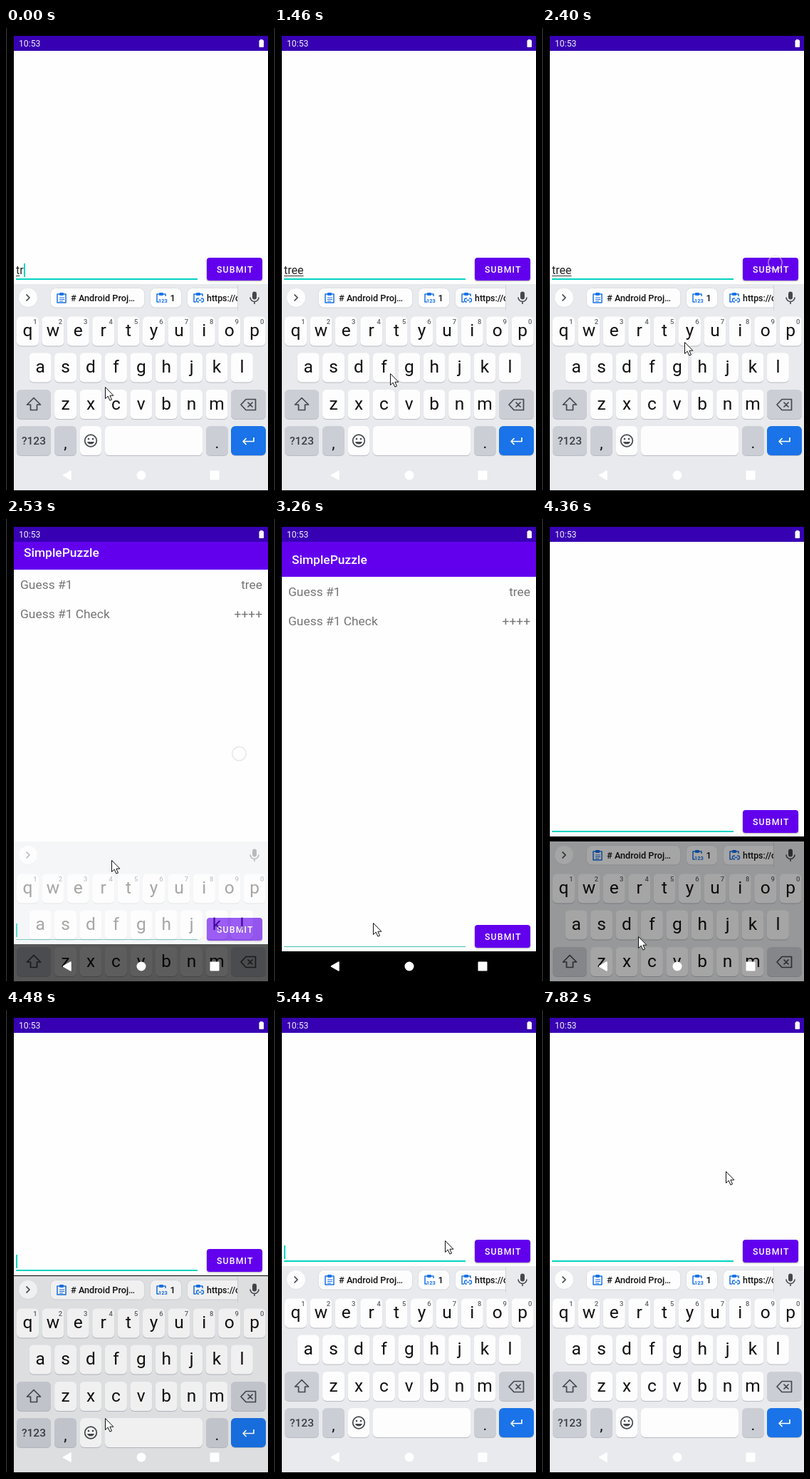
Write an HTML page with a canvas that moves like this. It is 368 px wide and 649 px high and loops after 8000 ms.

```html
<!DOCTYPE html>
<html lang="en">
<head>
<meta charset="utf-8">
<title>Word guessing app</title>
<style>
html, body { margin: 0; width: 368px; height: 649px; overflow: hidden; background: #000; }
canvas { display: block; width: 368px; height: 649px; }
</style>
</head>
<body>
<canvas id="stage"></canvas>
<script>
const W = 368, H = 649, LOOP = 8000, PAN = 247;
const dpr = window.devicePixelRatio || 1;
const PURPLE = '#6200ee', TEAL = '#03d3c0', BLUE = '#1a73e8', INK = '#44474b';
const GREY_KEY = '#cbced5', BOARD = '#e8eaed';

function prepare(canvas) {
  canvas.width = W * dpr;
  canvas.height = H * dpr;
  const ctx = canvas.getContext('2d');
  ctx.scale(dpr, dpr);
  return ctx;
}
const main = prepare(document.getElementById('stage'));

// ---------- drawing helpers ----------
function box(c, x, y, w, h, color, r = 0) {
  c.fillStyle = color;
  c.beginPath();
  if (r) c.roundRect(x, y, w, h, r); else c.rect(x, y, w, h);
  c.fill();
}
function text(c, str, x, y, size, color, { weight = 400, align = 'left', spacing = 0 } = {}) {
  c.font = `${weight} ${size}px Roboto, sans-serif`;
  c.letterSpacing = spacing + 'px';
  c.textAlign = align;
  c.fillStyle = color;
  c.fillText(str, x, y);
}
function line(c, d, color, width = 1.7) {
  c.strokeStyle = color;
  c.lineWidth = width;
  c.stroke(new Path2D(d));
}
function disc(c, x, y, r, color) {
  c.fillStyle = color;
  c.beginPath();
  c.arc(x, y, r, 0, 7);
  c.fill();
}
function shape(c, d, color) {
  c.fillStyle = color;
  c.fill(new Path2D(d));
}

// ---------- keyboard ----------
function key(c, x, y, w, color = '#fdfdfe') {
  box(c, x, y + 1, w, 41, '#b9bcc2', 6);
  box(c, x, y, w, 41, color, 6);
}
function letterRow(c, letters, x, y, hints) {
  [...letters].forEach((ch, i) => {
    const cx = x + i * 35.4;
    key(c, cx - 15.5, y, 31);
    text(c, ch, cx, y + 27.5, 24.5, '#111', { align: 'center' });
    if (hints) text(c, (i + 1) % 10, cx + 10.5, y + 10, 9.5, '#5f6368', { weight: 500, align: 'center' });
  });
}
function clipboard(c, x, y, open) {
  const side = open ? `M${x + 4} ${y + 13}H${x + 1}V${y + 2}H${x + 13}V${y + 5}`
                    : `M${x + 1} ${y + 2}H${x + 13}V${y + 14}H${x + 1}Z`;
  line(c, side, BLUE, 1.5);
  box(c, x + 4, y, 6, 4, BLUE, 1);
}
function chip(c, x, w) {
  box(c, x - .5, 364.5, w + 1, 28, '#d3d6da', 7);
  box(c, x, 365, w, 26.5, '#fdfdfe', 6.5);
}
function drawChips(c) {
  const style = { weight: 500 };
  c.save();
  c.beginPath();
  c.rect(50, 359, 275, 40);
  c.clip();
  chip(c, 63, 131);
  clipboard(c, 71, 371);
  line(c, 'M75 378H82M75 380.5H82M75 383H80', BLUE, 1.2);
  text(c, '# Android Proj…', 91, 383, 12.7, '#111', style);
  chip(c, 203, 43);
  clipboard(c, 211, 371, true);
  text(c, '123', 214, 385, 7.5, BLUE, { weight: 700 });
  text(c, '1', 230.5, 383, 12.7, '#111', style);
  chip(c, 255, 90);
  clipboard(c, 263, 371, true);
  line(c, 'M271 379H270A2.5 2.5 0 0 0 270 384H271M274 379H275A2.5 2.5 0 0 1 275 384H274M270.5 381.5H274.5', BLUE, 1.4);
  text(c, 'https://c', 282, 383, 12.4, '#111', style);
  c.restore();
  box(c, 325, 360, 1, 36, '#d0d3d7');
}
function makeKeyboard(withChips) {
  const canvas = document.createElement('canvas');
  const c = prepare(canvas);
  c.lineJoin = 'round';
  box(c, 11, 359, W - 11, H - 359, BOARD);

  disc(c, 31, 378.5, 13.3, '#dcdfe3');
  disc(c, 31, 378, 13, '#fdfdfe');
  line(c, 'M28.5 373.5L33 378L28.5 382.5', INK);
  if (withChips) drawChips(c);
  box(c, 346, 369.5, 6, 11, INK, 3);
  line(c, 'M343 377.5A6 6 0 0 0 355 377.5M349 383.5V387', INK, 1.6);

  letterRow(c, 'qwertyuiop', 30.5, 404.5, true);
  letterRow(c, 'asdfghjkl', 48.2, 455.5);
  letterRow(c, 'zxcvbnm', 83.6, 507);

  key(c, 15, 507, 48, GREY_KEY);
  line(c, 'M39 518.5L48.5 528H43.5V535.5H34.5V528H29.5Z', INK);
  key(c, 316, 507, 49, GREY_KEY);
  line(c, 'M337 520.5H350.5V535.5H337L330 528ZM339.5 524.5L346.5 531.5M346.5 524.5L339.5 531.5', INK);

  key(c, 15, 558, 48, GREY_KEY);
  text(c, '?123', 39, 584, 15.5, '#3c4043', { weight: 500, align: 'center' });
  key(c, 68, 558, 31, GREY_KEY);
  text(c, ',', 83.5, 589, 22, '#111', { align: 'center' });
  key(c, 104, 558, 30);
  line(c, 'M127.3 578.5A8.3 8.3 0 1 1 110.7 578.5A8.3 8.3 0 1 1 127.3 578.5Z', INK);
  disc(c, 116, 576, 1.3, INK);
  disc(c, 122, 576, 1.3, INK);
  shape(c, 'M114 580H124A5.2 4.6 0 0 1 114 580Z', INK);
  key(c, 139, 558, 137);
  key(c, 281, 558, 31, GREY_KEY);
  text(c, '.', 296.5, 589, 22, '#111', { align: 'center' });
  key(c, 316, 558, 49, BLUE);
  line(c, 'M348 574V579.5H333M337.5 575L333 579.5L337.5 584', '#fff');
  return canvas;
}
const fullBoard = makeKeyboard(true), bareBoard = makeKeyboard(false);

// ---------- timing ----------
// The screen refreshes only at these moments.
const TICKS = [0, 140, 420, 630, 850, 1060, 1460, 1580, 1720, 1860, 1990, 2120, 2260, 2400,
  2530, 2680, 2960, 3110, 3260, 3410, 3550, 3690, 3820, 3950, 4210, 4360, 4480, 4620,
  4760, 4900, 5040, 5170, 5320, 5440, 5870, 6300, 6830, 7410, 7820];
// time, x, y
const POINTER = [[0, 139, 503], [850, 139, 503], [1060, 141, 501], [1460, 163, 484],
  [1860, 327, 329], [2120, 327, 329], [2400, 200, 440], [2530, 148, 478], [2680, 139, 509],
  [3260, 139, 566], [3690, 135, 585], [4360, 135, 585], [4480, 139, 572], [5170, 222, 386],
  [5440, 240, 323], [5870, 258, 226]];
// time, app pan, keyboard drop, keyboard opacity
const LAYOUT = [[0, PAN, 0, 1], [2400, PAN, 0, 1], [2530, 10, 93, .37], [2680, 0, 120, 0],
  [3950, 0, 240, 0], [4210, 40, 225, .16], [4360, 161, 93, .65], [4480, 234, 14, .95], [4620, PAN, 0, 1]];
const CARET_ON = [[0, 1460], [1990, 2400], [2530, 2960], [3410, 3950], [4480, 4900],
  [5440, 5870], [6300, 6830], [7410, 7820]];

function track(rows, t) {
  const i = rows.findIndex(r => r[0] > t);
  if (i < 0) return rows.at(-1).slice(1);
  const a = rows[i - 1], b = rows[i], f = (t - a[0]) / (b[0] - a[0]);
  return a.slice(1).map((v, j) => Math.round((v + (b[j + 1] - v) * f) * 100) / 100);
}

// ---------- screen parts ----------
function drawInput(c, t, y, thin) {
  const typed = t >= 2530 ? '' : 'tree'.slice(0, t < 140 ? 2 : t < 420 ? 3 : 4);
  const marked = t < 630 ? typed.slice(0, -1) : typed;
  text(c, typed, 14, y + 345, 16, '#212121');
  const end = 14 + c.measureText(typed).width;
  if (marked) box(c, 14, y + 347, c.measureText(marked).width, 1, '#333');
  if (thin) box(c, 14, y + 352, 255, 1, '#45bdb0');
  else box(c, 14, y + 351, 255, 2, TEAL);
  if (CARET_ON.some(([a, b]) => t >= a && t < b)) box(c, Math.round(end), y + 330, 2, 19, TEAL);
}
function drawApp(c, t, pan) {
  const y = PAN - pan, grey = '#757575', right = { align: 'right' };
  c.save();
  c.beginPath();
  c.rect(11, 32, W - 11, H - 32);
  c.clip();
  box(c, 11, 32, W - 11, 574 - pan, '#fefefe');
  if (t >= 2530) {
    text(c, 'Guess #1', 20, 108 - pan, 17.4, grey);
    text(c, 'tree', 360, 108 - pan, 17.4, grey, right);
    text(c, 'Guess #1 Check', 20, 149 - pan, 17.4, grey);
    text(c, '++++', 360, 149 - pan, 17.4, grey, right);
  }
  box(c, 11, 32 - pan, W - 11, 49, PURPLE);
  text(c, 'SimplePuzzle', 25, 63 - pan, 17.4, '#fff', { weight: 500 });
  drawInput(c, t, y, pan < 20);
  box(c, 281.5, y + 323, 79, 32.5, 'rgba(0,0,0,.2)', 4);
  box(c, 282, y + 322, 78, 32, PURPLE, 4);
  text(c, 'SUBMIT', 296, y + 342.5, 12.3, '#fff', { weight: 500, spacing: 1.15 });
  c.restore();
}
function drawStatus(c) {
  box(c, 11, 11, W - 11, 21, '#3700b3');
  text(c, '10:53', 18, 26, 12.2, '#f4f0fb');
  box(c, 355.5, 17, 6.5, 10, '#fff', 1);
  box(c, 357, 16, 3.5, 2, '#fff');
}
function drawNav(c) {
  c.lineJoin = 'round';
  shape(c, 'M91 621V633L80.5 627Z', '#fff');
  line(c, 'M91 621V633L80.5 627Z', '#fff', 1.5);
  disc(c, 190, 627, 6.5, '#fff');
  box(c, 286.5, 620.5, 13, 13, '#fff', 1);
}
function drawTouch(c, t) {
  if (t < 1990 || t > 2530) return;
  c.beginPath();
  c.arc(327.5, 329, 9.7, 0, 7);
  c.strokeStyle = t < 2530 ? 'rgba(225,225,225,.6)' : 'rgba(0,0,0,.09)';
  c.lineWidth = 1.5;
  c.stroke();
}
function drawPointer(c, x, y) {
  c.save();
  c.translate(Math.round(x) + .5, Math.round(y) + .5);
  c.lineJoin = 'miter';
  const arrow = 'M0 0V16L3.7 12.6L6.4 18.6L9 17.5L6.4 11.7H11.4Z';
  shape(c, arrow, '#fff');
  line(c, arrow, '#111', 1);
  c.restore();
}

function render(time) {
  const t = TICKS.findLast(v => v <= time % LOOP);
  const c = main, [pan, drop, alpha] = track(LAYOUT, t).map((v, i) => i < 2 ? Math.round(v) : v);
  box(c, 0, 0, W, H, '#000');
  box(c, 0, 0, 1, H, '#3a3a3a');
  drawApp(c, t, pan);
  drawStatus(c);
  if (alpha > 0) {
    c.globalAlpha = alpha;
    c.drawImage(t === 2530 ? bareBoard : fullBoard, 0, drop, W, H);
    c.globalAlpha = 1;
  }
  drawNav(c);
  box(c, 0, 648, W, 1, '#000');
  drawTouch(c, t);
  drawPointer(c, ...track(POINTER, t));
}

let start;
function loop(now) {
  start ??= now;
  render(Math.max(0, now - start));
  requestAnimationFrame(loop);
}
render(0);
requestAnimationFrame(loop);
</script>
</body>
</html>
```
